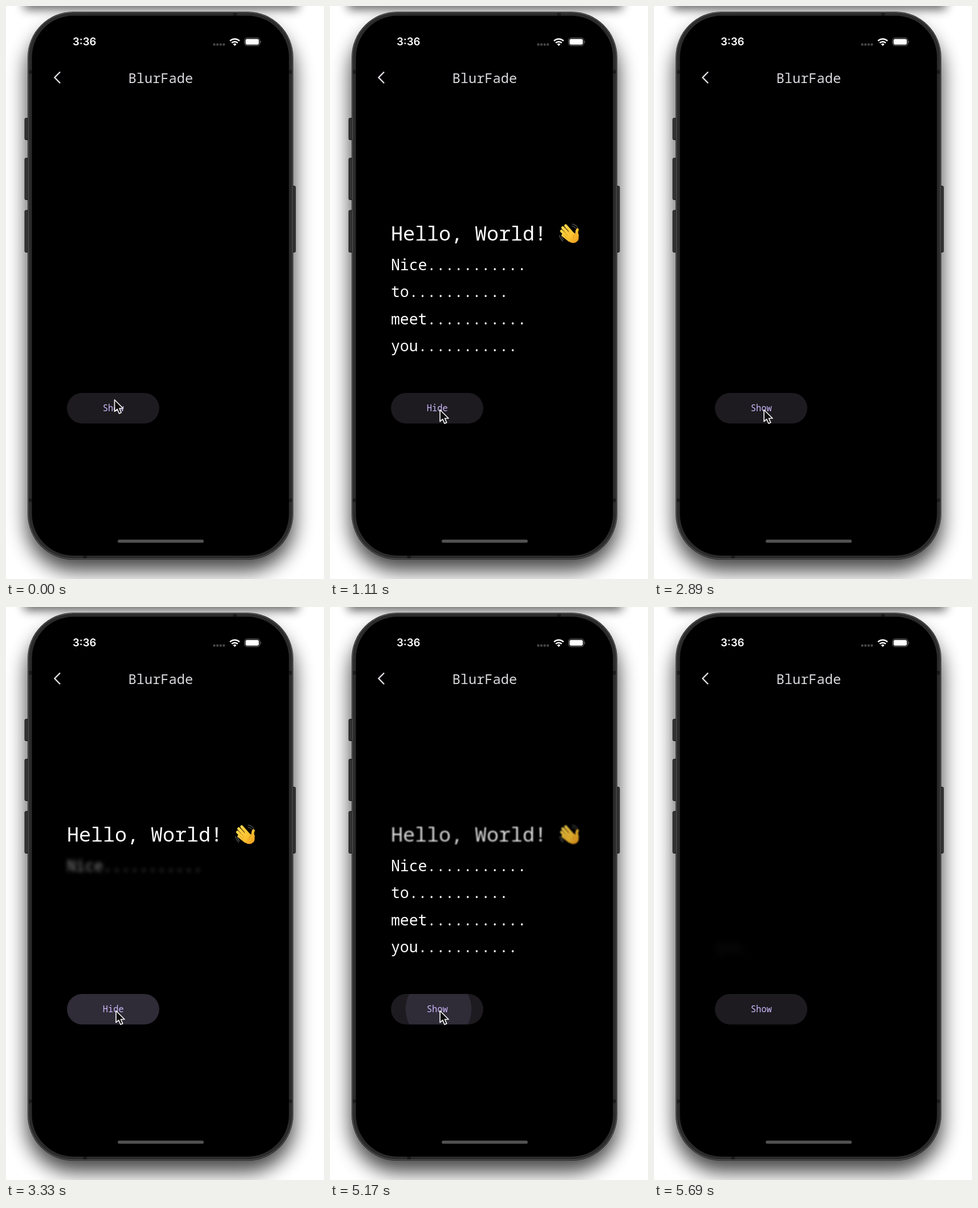
These frames come from a looping animation (558 by 1004 pixels, 5720 ms). An HTML page:

```html
<!DOCTYPE html>
<html lang="en">
<head>
<meta charset="utf-8">
<title>BlurFade</title>
<style>
html, body { margin: 0; width: 100%; height: 100%; overflow: hidden; background: #fff; }
svg { display: block; width: 558px; height: 1004px; }
.mono { font-family: "Roboto Mono", "Noto Sans Mono", "DejaVu Sans Mono", monospace; white-space: pre; }
.line { fill: #fff; font-size: 26.4px; font-weight: 500; }
.big { font-size: 35px; }
</style>
</head>
<body>
<svg viewBox="0 0 558 1004" xmlns="http://www.w3.org/2000/svg">
  <defs>
    <clipPath id="pill"><rect x="107" y="678" width="162" height="53.5" rx="26.7"/></clipPath>
    <linearGradient id="skin" x1="402" y1="384" x2="434" y2="416" gradientUnits="userSpaceOnUse">
      <stop offset="0" stop-color="#ffdc4e"/><stop offset=".6" stop-color="#fcc433"/><stop offset="1" stop-color="#ec9a1c"/>
    </linearGradient>
  </defs>

  <!-- shadows -->
  <rect x="36" y="34" width="470" height="956" rx="84" opacity=".72" style="filter:blur(17px)"/>
  <rect x="32" y="-60" width="480" height="66" opacity=".62" style="filter:blur(9px)"/>

  <!-- phone -->
  <g fill="#333" stroke="#1c1c1c">
    <rect x="33" y="196.500" width="8" height="38" rx="2"/>
    <rect x="33" y="266.500" width="8" height="73" rx="2"/>
    <rect x="33" y="358" width="8" height="73.500" rx="2"/>
    <rect x="500" y="315.500" width="8" height="116" rx="2"/>
  </g>
  <rect x="38" y="10" width="466" height="960" rx="80" fill="#161616"/>
  <rect x="39.300" y="11.300" width="463.400" height="957.400" rx="78.700" fill="#2b2b2b" stroke="#676767" stroke-width="1"/>
  <g fill="#1a1a1a">
    <rect x="40" y="112" width="6" height="6.500"/><rect x="496" y="112" width="6" height="6.500"/>
    <rect x="40" y="863" width="6" height="6"/><rect x="496" y="863" width="6" height="6"/>
    <rect x="398.500" y="12" width="6.500" height="5"/><rect x="135.500" y="963" width="6.500" height="5"/>
  </g>
  <rect x="45.500" y="17" width="451" height="946" rx="73"/>

  <!-- status bar -->
  <text x="117" y="69.300" fill="#fff" font-family="Inter, sans-serif" font-weight="600" font-size="18.500">3:36</text>
  <g fill="#464646">
    <circle cx="365.500" cy="67.500" r="2.200"/><circle cx="371" cy="67.500" r="2.200"/>
    <circle cx="376.600" cy="67.500" r="2.200"/><circle cx="382.200" cy="67.500" r="2.200"/>
  </g>
  <g fill="none" stroke="#fff" stroke-width="2.500">
    <path d="M393 61.200a12 12 0 0 1 16.800 0M396.100 64.700a7.600 7.600 0 0 1 10.600 0"/>
    <path d="M401.400 70l-2.900-3a4.200 4.200 0 0 1 5.800 0z" fill="#fff" stroke="none"/>
  </g>
  <rect x="418.500" y="56" width="27" height="13.500" rx="4.300" fill="none" stroke="#777"/>
  <rect x="420.300" y="57.800" width="23.400" height="9.900" rx="2.700" fill="#fff"/>
  <path d="M446.700 60.700q2 2.100 0 4.200z" fill="#777"/>

  <!-- app bar -->
  <path d="M95 115.500L85.300 125.300L95 135.200" fill="none" stroke="#e4e0e6" stroke-width="2.300"/>
  <text class="mono" x="214.500" y="135" font-size="23.700" fill="#dcd9de">BlurFade</text>
  <rect x="196" y="935" width="151" height="5.500" rx="2.700" fill="#515151"/>

  <g id="lines"></g>

  <g id="hand">
    <g fill="none" stroke="#555" stroke-width="1.200" stroke-linecap="round">
      <path d="M402.500 402q1.500 6 6 10M405.700 402.500q1 4.500 4 7M425 382.200q6 1 9.500 6M424.600 385.500q4.500 1 6.500 4"/>
    </g>
    <g fill="none" stroke="url(#skin)" stroke-linecap="round" stroke-linejoin="round">
      <path d="M413.500 384.800L426 399M408.300 388.500L422 403M406.200 394.500L420 407M408.700 401.500L420 410.500" stroke-width="5"/>
      <path d="M434.200 391.800q-2.500 4.500 0 10" stroke-width="4.800"/>
    </g>
    <path d="M420 394L429 398Q433 398 436 402Q438 411 431 414.500Q423 417.500 416 409L413 401Z" fill="url(#skin)"/>
    <path d="M412.500 389l7 8M409.500 394.500l8 8M410 401l6 5.500M431.500 399q-5 2-4.500 8" fill="none" stroke="#d98b17" stroke-width=".9" stroke-linecap="round"/>
  </g>

  <!-- button -->
  <g clip-path="url(#pill)">
    <rect x="107" y="678" width="162" height="54" fill="#1d1b20"/>
    <circle id="ripple" cy="704.700" fill="#d0bcff"/>
  </g>
  <text id="label" class="mono" x="188.300" y="710" text-anchor="middle" font-size="15.400" font-weight="500" fill="#ccb8fa">Show</text>

  <path id="cursor" d="M0 0V20.500L4.700 16.300L8 24L11.700 22.400L8.500 15H15Z" fill="#0c0c0c" stroke="#f0f0f0" stroke-width="1.700" stroke-linejoin="round"/>
</svg>
<script>
const NS = 'http://www.w3.org/2000/svg', LOOP = 5720;
const STAGGER = 100, FADE = 155, BLUR = 8, HOLD = 80;
const $ = id => document.getElementById(id);
const clamp = v => Math.max(0, Math.min(1, v));
const mix = (a, b, p) => a + (b - a) * p;

// press time of each tap, and whether it reveals the text
const taps = [
  { at: 5, show: true }, { at: 1560, show: false },
  { at: 3070, show: true }, { at: 5070, show: false }
];
// time, x, y
const path = [[0, 190.5, 690], [30, 190.5, 690], [260, 193, 707.5], [5340, 193, 707.5], [5660, 526, 1012]];

function add(parent, tag, attrs) {
  const el = document.createElementNS(NS, tag);
  for (const k in attrs) el.setAttribute(k, attrs[k]);
  return parent.appendChild(el);
}

const dots = '.'.repeat(11);
const lines = ['Hello, World!', ...['Nice', 'to', 'meet', 'you'].map(w => w + dots)].map((str, i) => {
  const y = i ? 463 + (i - 1) * 47.4 : 411;
  const clip = add(document.querySelector('defs'), 'clipPath', { id: 'clip' + i });
  add(clip, 'rect', { x: 99, y: y - 44, width: 360, height: 67 });
  const box = add($('lines'), 'g', { 'clip-path': `url(#clip${i})` });
  const g = add(box, 'g', {});
  add(g, 'text', { class: 'mono line' + (i ? '' : ' big'), x: 107, y }).textContent = str;
  if (!i) g.appendChild($('hand'));
  return g;
});

function drawText(t, tap) {
  const start = tap.at + HOLD;
  lines.forEach((g, i) => {
    const p = clamp((t - start - i * STAGGER) / FADE);
    const v = tap.show ? p : 1 - p;
    g.style.opacity = v;
    g.style.visibility = v > 0 ? 'visible' : 'hidden';
    g.style.filter = v < 1 && v > 0 ? `blur(${BLUR * (1 - v)}px)` : 'none';
  });
  $('label').textContent = (t >= start) === tap.show ? 'Hide' : 'Show';
}

function drawRipple(age) {
  const fade = clamp(age / 75) * clamp((HOLD + 375 - age) / 150);
  const p = clamp(age / 200);
  const el = $('ripple');
  el.setAttribute('r', mix(25, 90, p));
  el.setAttribute('cx', mix(193, 188, p));
  el.setAttribute('opacity', age < 0 ? 0 : 0.1 * fade);
}

function drawCursor(t) {
  let i = 0;
  while (i < path.length - 2 && t >= path[i + 1][0]) i++;
  const [t0, x0, y0] = path[i], [t1, x1, y1] = path[i + 1];
  const p = clamp((t - t0) / (t1 - t0)), e = p * p * (3 - 2 * p);
  $('cursor').setAttribute('transform', `translate(${mix(x0, x1, e)} ${mix(y0, y1, e)})`);
}

function frame() {
  const t = performance.now() % LOOP;
  const tap = taps.filter(k => k.at <= t).pop() || taps[0];
  drawText(t, tap);
  drawRipple(t - tap.at);
  drawCursor(t);
  requestAnimationFrame(frame);
}
frame();
</script>
</body>
</html>
```
